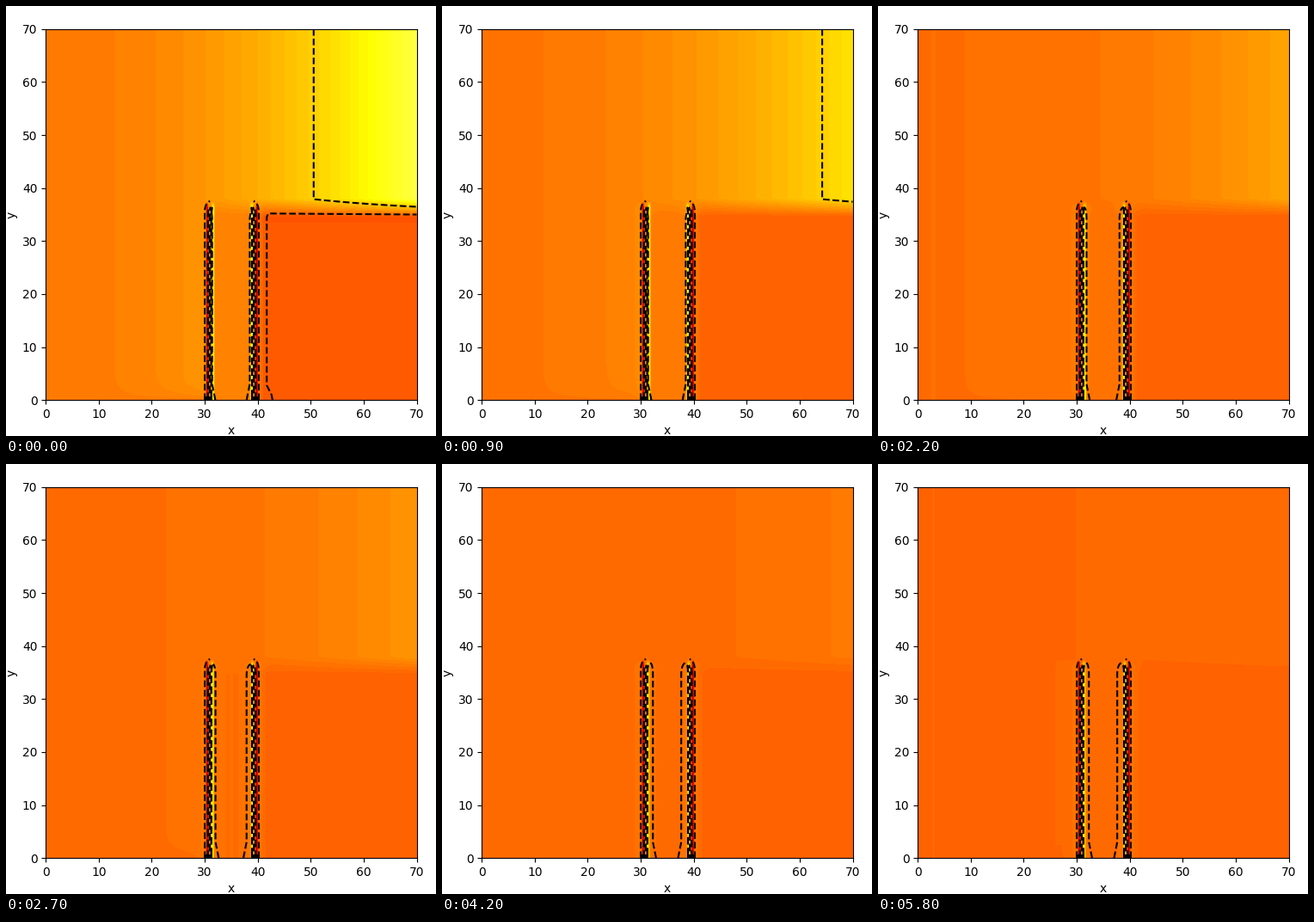
These frames come from a looping animation (500 px wide and 500 px high, 5.9 s). A matplotlib script:

```python
import numpy as np
import matplotlib.pyplot as plt
from matplotlib.animation import FuncAnimation

FRAMES, STEP = 59, 100
SIZE, GRID = 70, 432
LEVEL = 13              # contour level of the fast stream
Y0, Y1 = 34.6, 37.9     # shear layer between the two streams
DASH = (3.7, 1.6)

x = ((np.arange(GRID) + 0.5) * SIZE / GRID)[None, :]
y = x.T


def bell(v, mid, width):
    return np.exp(-((v - mid) / width) ** 2)


def fade(t):
    return max(0, 1 - t / 9)


def stream(t):
    """Level, rise and power of the upper profile, and the sheltered level."""
    base = 3.056 * np.exp(-0.03 * t) - 1.106
    rise = np.exp(3.118 - 0.05 * t - 0.00017 * t * t)
    power = np.interp(t, [9, 20], [2.2, 2.7])
    return base, rise, power, -1 - fade(t)


def field(t):
    base, rise, power, low = stream(t)
    top = base + rise * (x / SIZE) ** power
    left = base + rise * (np.minimum(x, 30) / SIZE) ** power * (1 - np.exp(-y / 1.2))
    left = left + 0.1 * bell(x, 26.5, 0.5) * (y > 2.5)
    mid = base + 0.03 * rise + 0.1 * bell(x, 35, 0.5)
    right = low - 0.8 * fade(t) * bell(y, 34, 0.8)
    right = right + (mid - low) * np.clip((41.2 - x) / 1.2, 0, 1)
    below = np.where(x < 31, left, np.where(x < 40, mid, right))
    f = below + (top - below) * np.clip((y - Y0) / (Y1 - Y0), 0, 1)
    f = f + 0.22 * bell(x, 3, 0.25)

    # each wall: a dark and a bright streak in a soft halo
    tall = np.clip((37.4 - y) / 1.2, 0, 1)
    halo = 2.4 * (t / (FRAMES - 1)) ** 0.4
    shift = 0.2 * np.clip((t - 17) / 17, 0, 1)
    for dark, bright in ((30.45, 31.55 - shift), (39.8, 38.85 + shift)):
        f = f + tall * (halo * bell(x, (dark + bright) / 2, 1.8)
                        + 18 * bell(x, bright, 0.25) - 24 * bell(x, dark, 0.2))
    return f


def high_edge(t):
    base, rise, power, low = stream(t)
    part = (LEVEL - base) / rise
    if part >= 1:
        return [], []
    xs = np.linspace(SIZE * part ** (1 / power), SIZE, 30)
    top = base + rise * (xs / SIZE) ** power
    ys = Y0 + (Y1 - Y0) * (LEVEL - low) / (top - low)
    return np.r_[xs[0], xs], np.r_[SIZE, ys]


def low_edge(t):
    if fade(t) < 0.3:
        return [], []
    return [42.8, 42.6, 41.7, 41.7, 42, SIZE], [0, 1, 2.8, 34.5, 35.2, 35]


def arch(x0, width, top, foot=0):
    a = np.linspace(0, np.pi / 2, 8)
    xs = x0 + width * (1 - np.cos(a))
    ys = top - 2 + 2 * np.sin(a)
    return np.r_[x0 + foot, x0, xs], np.r_[0, 3, ys]


def inner_edges(t):
    grow = np.sqrt(np.clip((t - 17) / 20, 0, 1))
    top = 36 + 0.8 * grow
    return (arch(31.4 + 0.9 * grow, -0.5, top, 0.6),
            arch(38.5 - 0.85 * grow, 0.8, top, -0.6))


fig = plt.figure(figsize=(5, 5), dpi=100)
ax = fig.add_axes([0.0925, 0.08375, 0.8625, 0.8625])
img = ax.imshow(field(0), cmap=plt.get_cmap("hot", 85), vmin=-44.5, vmax=40.5,
                origin="lower", extent=(0, SIZE, 0, SIZE),
                interpolation="nearest", aspect="auto")

# fixed contours of the two mirrored walls
for edge, side in ((30, 1), (40.2, -1)):
    ax.plot(*arch(edge, side, 37.5), "k--", lw=1.5)
    for k in range(3):
        cx = edge + side * (0.6 + 0.33 * k)
        ax.plot(*arch(cx, 0.2 * side, 36.4), "k", lw=1.7, ls=(2 * k, DASH))
    ax.plot([edge, edge + 1.5 * side], [0.4, 0.4], "k", lw=3, ls=(0, (1.2, 0.3)))

edges = [ax.plot([], [], "k--", lw=1.5)[0] for _ in range(4)]
ax.set(xlim=(0, SIZE), ylim=(0, SIZE), xlabel="x", ylabel="y",
       xticks=range(0, 71, 10), yticks=range(0, 71, 10))


def draw(t):
    img.set_data(field(t))
    for line, pts in zip(edges, (high_edge(t), low_edge(t), *inner_edges(t))):
        line.set_data(*pts)
    return [img, *edges]


anim = FuncAnimation(fig, draw, frames=FRAMES, interval=STEP, repeat=True,
                     repeat_delay=0)
plt.show()
```
